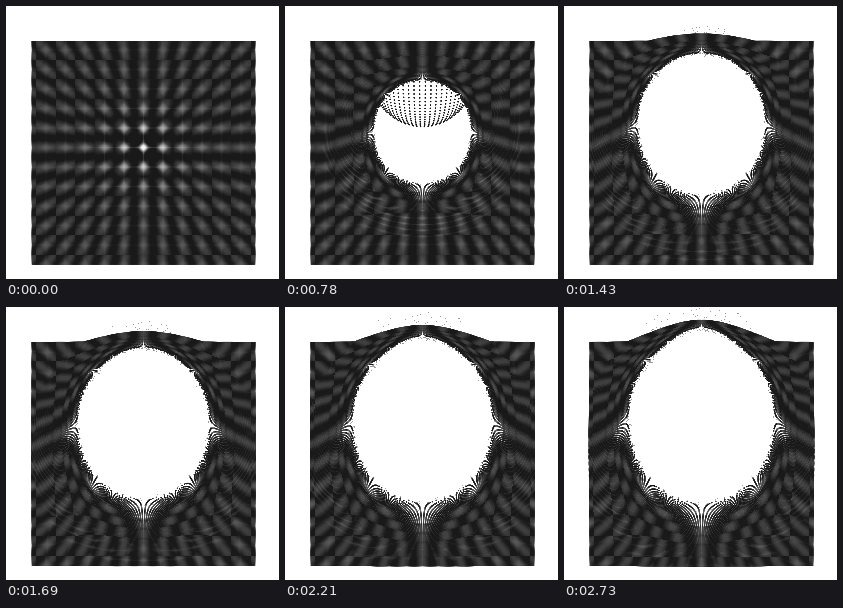
These frames come from a looping animation (273x273 px, 2.86 s). An HTML page with a canvas:

```html
<!DOCTYPE html>
<html lang="en">
<head>
<meta charset="utf-8">
<title>Blast in a particle lattice</title>
<style>
html, body { margin: 0; width: 100%; height: 100%; overflow: hidden; background: #fff; }
canvas { display: block; width: 273px; height: 273px; }
</style>
</head>
<body>
<canvas id="stage" width="273" height="273"></canvas>
<script>
const SIZE = 273, STEP = 130, STEPS = 22;
const CX = 137, CY = 141;      // blast centre
const GAP = 1.054;             // lattice spacing
const BEAT = 19.5;             // distance between the light patches
const ctx = document.getElementById('stage').getContext('2d');
const image = ctx.createImageData(SIZE, SIZE);
const pixels = new Uint32Array(image.data.buffer);
const nearest = new Float32Array(SIZE * SIZE);
const light = new Float32Array(SIZE * SIZE);

// step, reach up, reach down, half width, extra height of the tip
const KEYS = [
  [0, 0, 0, 0, 0], [1, 18, 14, 16, 0], [4, 57, 29, 41, 0], [8, 77, 41, 55, 0],
  [11, 94, 46, 63, 0], [13, 101, 49, 65, 2], [17, 112, 52, 69, 5], [21, 121, 53, 72, 8]
];

const clamp = v => Math.max(0, Math.min(1, v));
const hash = (a, b) => {
  const v = Math.sin(a * 127.1 + b * 311.7) * 43758.5453;
  return v - Math.floor(v);
};

function cavityAt(step) {
  const n = Math.max(1, KEYS.findIndex(k => k[0] >= step));
  const a = KEYS[n - 1], b = KEYS[n];
  const f = (step - a[0]) / (b[0] - a[0]);
  const [, up, down, rx, tip] = a.map((v, i) => v + (b[i] - v) * f);
  return { rx, ry: (up - tip + down) / 2, lift: (up - tip - down) / 2, tip };
}

// Each pixel keeps its closest particle
function stamp(x, y, glow) {
  const px = Math.round(x), py = Math.round(y);
  for (let v = py - 1; v <= py + 1; v++) {
    if (v < 0 || v >= SIZE) continue;
    for (let u = px - 1; u <= px + 1; u++) {
      if (u < 0 || u >= SIZE) continue;
      const d = (u - x) ** 2 + (v - y) ** 2, k = v * SIZE + u;
      if (d < nearest[k]) {
        nearest[k] = d;
        light[k] = glow;
      }
    }
  }
}

// A loose particle covers one pixel
function speck(x, y) {
  const px = Math.round(x), py = Math.round(y), k = py * SIZE + px;
  if (py >= 0 && nearest[k] > 0.8) nearest[k] = 0.8;
}

// Light patches on a coarse grid, drawn out along the rays
function patch(x, y, r) {
  const ox = x - BEAT * Math.round(x / BEAT), oy = y - BEAT * Math.round(y / BEAT);
  const along = Math.abs(ox * x + oy * y) / r, across = Math.abs(ox * y - oy * x) / r;
  return (36 + 60 * Math.exp(-r / 30)) *
    clamp(1.3 - across / 5) * clamp(1.4 - along / (3 + r * 0.13));
}

function place(i, j, step, c) {
  const x = (i + 0.5) * GAP, y = (j + 0.5) * GAP;
  const r = Math.hypot(x, y), ux = x / r, uy = y / r;

  // elliptic shell around the cavity, lifted most at the wall
  const e = Math.hypot(ux * c.rx, uy * c.ry);
  const out = ((step ? e + 0.25 * r : 0) ** 16 + r ** 16) ** (1 / 16);
  const w = clamp(1 - (out - e) / 50) ** (1 + Math.max(0, uy));
  const lift = c.lift + c.tip * Math.max(0, -uy) ** 12;
  const dx = ux * out + w * ux * (c.rx - e);
  const dy = uy * out + w * (uy * (c.ry - e) - lift);
  stamp(CX + dx, CY + dy, patch(x, y, r));

  const chance = hash(i, j), far = hash(j, i);
  if (step && r < 30 && chance > 0.75) {
    const k = 1 - 0.06 * far * far;
    speck(CX + dx * k, CY + (dy + lift) * k - lift);
  }
  if (step > 7 && j < -99 && Math.abs(x) < 3 * step - 10 && chance < 0.2) {
    const k = 1 + 0.12 * far * (1 - Math.exp((7 - step) / 4));
    speck(CX + dx * k, CY + dy * k);
  }
}

// The charge: a cloud that spreads and rises inside the cavity
function placeCloud(step, c) {
  const size = 9 * (1 + 0.78 * step), rise = 2 * step * step;
  for (let j = -19; j < 19; j++)
    for (let i = -14; i < 14; i++) {
      const x = (i + 0.5) / 14, y = (j + 0.5) / 19, q = Math.hypot(x, y);
      if (q > 1) continue;
      const k = size * Math.sin(q * Math.PI / 2) / q;
      const gx = x * k, gy = y * k - rise;
      if ((gx / c.rx) ** 2 + ((gy + c.lift) / c.ry) ** 2 < 1) stamp(CX + gx, CY + gy, 0);
    }
}

function draw(step) {
  const cavity = cavityAt(step);
  nearest.fill(9);
  light.fill(0);
  for (let j = -101; j <= 110; j++)
    for (let i = -106; i <= 105; i++) place(i, j, step, cavity);
  if (step && step < 8) placeCloud(step, cavity);

  for (let k = 0; k < pixels.length; k++) {
    const d = Math.sqrt(nearest[k]);
    const r = Math.hypot(k % SIZE - CX, Math.floor(k / SIZE) - CY);
    const gap = Math.max(30, 190 / (1 + (r / 30) ** 1.5));
    const grey = Math.min(245, 25 + light[k] + gap * clamp((d - 0.48) / 0.27));
    const tone = Math.round(grey + (255 - grey) * clamp((d - 0.77) / 0.25));
    pixels[k] = 0xff000000 | tone << 16 | tone << 8 | tone;
  }
  ctx.putImageData(image, 0, 0);
}

let shown = -1;
const start = performance.now();
function tick() {
  const step = Math.floor((performance.now() - start) / STEP) % STEPS;
  if (step !== shown) draw(shown = step);
  requestAnimationFrame(tick);
}
tick();
</script>
</body>
</html>
```
